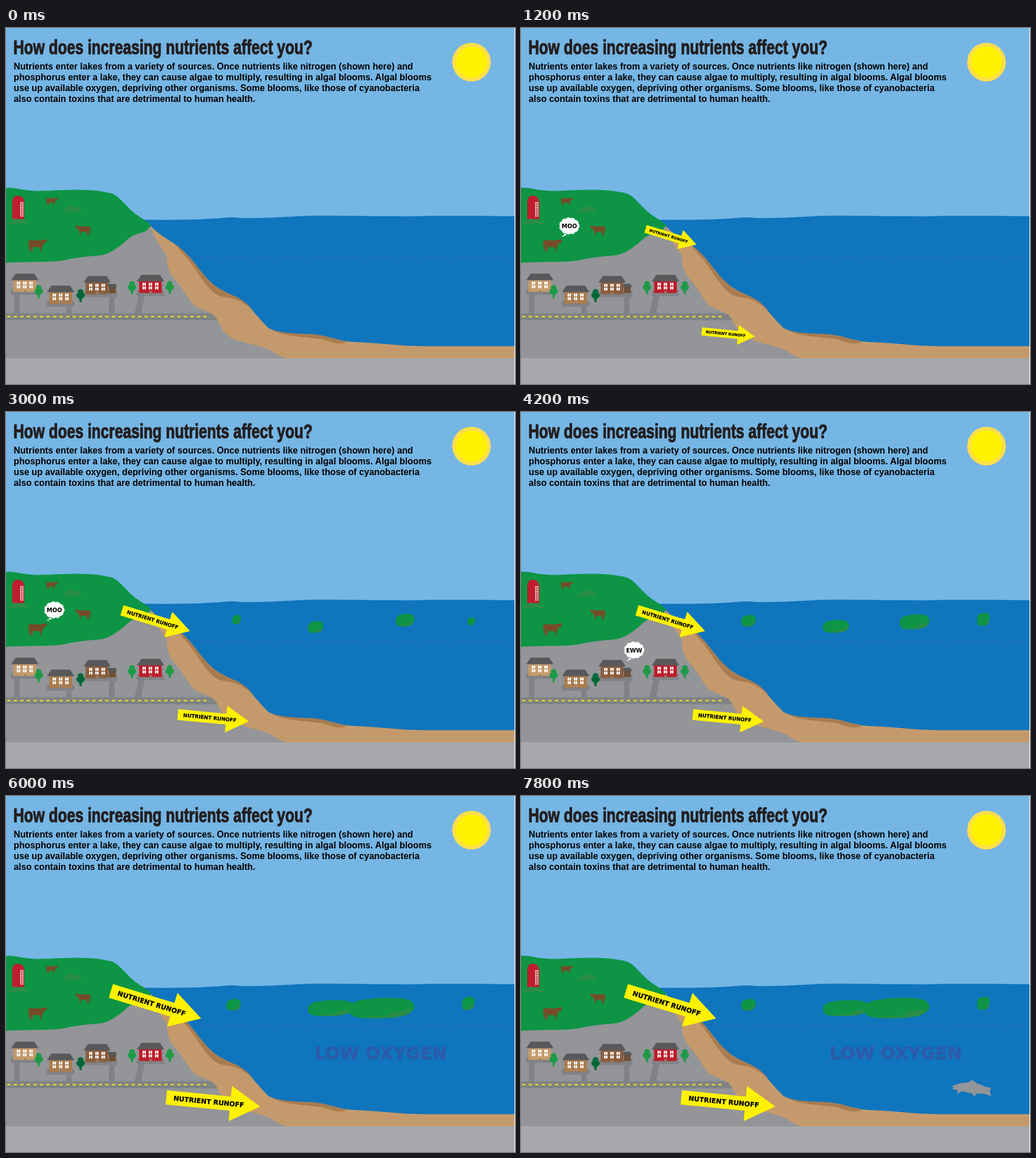
Write an HTML page that moves like this. It is 895 px wide and 626 px high and loops after 8000 ms.

```html
<!DOCTYPE html>
<html lang="en">
<head>
<meta charset="utf-8">
<title>How does increasing nutrients affect you?</title>
<style>
  html, body { margin: 0; width: 100%; height: 100%; overflow: hidden; background: #75b6e5; }
  svg { display: block; }
  .intro { font: bold 15.8px "Liberation Sans", Arial, sans-serif; }
  .title { font: bold 35px "Liberation Sans", Arial, sans-serif; fill: #231f20; stroke: #231f20; stroke-width: 1.2; }
  .wide { font-family: "DejaVu Sans", Verdana, sans-serif; font-weight: bold; text-anchor: middle; }
</style>
</head>
<body>
<svg width="895" height="626" viewBox="0 0 895 626">
  <defs>
    <path id="cow" d="M1 5Q2 2 5 2L23 2.5 27 1 29 1.5 33 0 34 4 31 7 28 8 26 14 24.500 16V22H22V16L20 14.500 10 14 9 17V22H6L5.500 16 4 21H2.500L3 12 2 8 1 14 0 15Z" fill="#754c29"/>
    <path id="bush" d="M-18 6Q-12 0-7-3L-3-7 2-3Q11-5 13 0L18 5 14 7 6 4-4 6Z" fill="#2a8d47"/>
    <g id="tree">
      <path d="M-1.500 3H1.500L2 13H-2Z"/>
      <circle cy="-5" r="5"/><circle cx="-3" cy="1" r="4.500"/><circle cx="3" cy="1" r="4.500"/><circle cy="4" r="4.500"/>
    </g>
    <g id="arrow">
      <path d="M-83-12.500H30V-31L83 0 30 31V12.500H-83Z" fill="#fff200"/>
      <text class="wide" x="-8" y="4.300" font-size="11.700" stroke="#000" stroke-width=".3">NUTRIENT RUNOFF</text>
    </g>
    <g id="bloom">
      <path d="M-.5.12C-.51-.2-.42-.38-.2-.43-.02-.5.2-.5.35-.44.48-.38.52-.15.49.05.45.28.36.38.2.44.02.5-.2.5-.34.46-.47.4-.5.28-.5.12Z" fill="#0d9545"/>
      <path d="M-.36.42Q-.1.38.08.35L.18.18.46.05Q.44.36.2.43-.1.51-.36.42Z" fill="#2a8d47"/>
    </g>
    <g id="cloud" fill="#fff"></g>
  </defs>

  <rect width="895" height="626" fill="#75b6e5"/>
  <circle cx="818.500" cy="60" r="34" fill="#ffde4d"/>
  <circle cx="818.500" cy="60" r="27.500" fill="#fff200"/>
  <text class="title" transform="translate(13 46) scale(.745 1)">How does increasing nutrients affect you?</text>
  <g id="intro" class="intro"></g>

  <path d="M238 337C290 338 335 337 365 335S395 332 410 334C450 335 490 332 525 330.500S680 332 720 331 830 330 895 331V581H238Z" fill="#0f75bd"/>
  <path d="M330 402.500H895" stroke="#2560b0" stroke-width="1.500" stroke-dasharray="6 5"/>
  <g id="algae"></g>
  <text id="oxygen" class="wide" x="659" y="463" font-size="30.800" fill="#2a5caa" stroke="#2a5caa">LOW OXYGEN</text>
  <path id="fish" d="M0 12Q14 4 29 5L37 0 44 6Q55 10 61 13L70 14 67 20 70 29 59 25 45 24 40 29 36 24 18 20 10 25 11 18Q5 18 1 16L5 14Z" fill="#939598"/>

  <path d="M0 350H256L300 400 340 460 400 520 500 581H0Z" fill="#939598"/>
  <g id="town">
    <path d="M0 501.500H380V514H0ZM14 466H24V503H14ZM106 486H115V503H106ZM181 470H191V503H181ZM234 466H245L237 503H226Z" fill="#808285"/>
    <path d="M2 507.500H358" stroke="#fff200" stroke-width="2" stroke-dasharray="6 5.500"/>
  </g>
  <path d="M252 346C265 359 276 367 288 374 315 390 328 409 343 428 364 455 380 462 403 472 428 485 438 505 461 527 477 538 518 538 558 543.500S590 551 610 552C660 554 690 559 735 559.500H895V581H492C478 576 474 571 462 565 440 556 410 553 394 543 373 529 376 511 362 503 350 495 338 495 328 485 312 464 310 456 297 442 278 420 287 410 281 397 269 380 260 368 254 349Z" fill="#c49a6c"/>
  <path d="M288 374C315 390 328 409 343 428 364 455 380 462 403 472 420 480 428 488 436 499 420 484 410 478 396 475 375 473 366 468 356 456 340 437 332 421 322 409 308 395 304 385 288 374ZM466 530C490 539 520 536 545 539S578 548 600 551C592 558 575 554 562 549 535 542 495 546 466 530Z" fill="#a97c50"/>
  <path d="M0 281C18 280 28 286 60 286.500 100 285 150 281 186 291 203 297 212 319 240 335L255 346Q251 356 239 360C222 364 216 369 208 377 193 389 181 398 164 400 138 402 122 404 104 408 80 413 40 410 0 413Z" fill="#0d9545"/>
  <rect y="581" width="895" height="45" fill="#a7a9ac"/>

  <use href="#bush" x="116" y="318"/>
  <use href="#bush" x="21" y="339"/>
  <path d="M11 336V304Q12 295 21 295T32 304V336Z" fill="#be1e2d"/>
  <path d="M25.500 306V332M30 306V332" stroke="#fff" stroke-width=".8"/>
  <path d="M27.800 306V332" stroke="#fff" stroke-width="4.500" stroke-dasharray="1 2"/>
  <use href="#cow" transform="translate(70 298) scale(.63)"/>
  <use href="#cow" transform="translate(149 347) scale(-.8 .8)"/>
  <use href="#cow" transform="translate(38 371)"/>
  <g id="houses"></g>
  <path d="M180 450H193L195 456H180Z" fill="#58595b"/>
  <path d="M181 456H193V466H181Z" fill="#754c29"/>
  <path d="M181 459H193M181 462H193" stroke="#58595b"/>
  <g fill="#1f9a49">
    <use href="#tree" x="57.500" y="462"/>
    <use href="#tree" x="131" y="469" fill="#006838"/>
    <use href="#tree" x="221.500" y="455"/>
    <use href="#tree" x="288" y="455"/>
  </g>

  <g id="arrows">
    <use href="#arrow"/>
    <use href="#arrow"/>
  </g>
  <g id="moo" transform="translate(85 348)">
    <use href="#cloud"/><text class="wide" y="4.200" font-size="10">MOO</text>
  </g>
  <g id="eww" transform="translate(199 418.500)">
    <use href="#cloud"/><text class="wide" y="4.200" font-size="9.800">EWW</text>
  </g>
  <rect x="894" width="1" height="626" fill="#fff"/>
</svg>
<script>
const $ = id => document.getElementById(id);
const LOOP = 8000, STEP = 600;

$('intro').innerHTML = [
  'Nutrients enter lakes from a variety of sources. Once nutrients like nitrogen (shown here) and',
  'phosphorus enter a lake, they can cause algae to multiply, resulting in algal blooms. Algal blooms',
  'use up available oxygen, depriving other organisms. Some blooms, like those of cyanobacteria',
  'also contain toxins that are detrimental to human health.'
].map((line, i) => `<text x="13.500" y="${73 + 19 * i}">${line}</text>`).join('');

const puff = (x, y, r) => `<circle cx="${x}" cy="${y}" r="${r}"/>`;
$('cloud').innerHTML = '<ellipse rx="15" ry="12"/>' + puff(-7.5, 15.5, 2) + puff(-11, 18, 1.3) +
  Array.from({ length: 11 }, (_, i) => {
    const a = i * Math.PI * 2 / 11;
    return puff(12.8 * Math.cos(a), 10 * Math.sin(a), 5.2);
  }).join('');

function house(x, y, wall, baseWidth = 48) {
  let panes = '';
  for (let i = 0; i < 3; i++)
    panes += `<path d="M${10 + 11 * i} 14h6v5h-6zm0 6.500h6v5h-6z" fill="#fff"/>
      <path d="M${13 + 11 * i} 14v12" stroke="${wall}" stroke-width=".8"/>`;
  return `<g transform="translate(${x} ${y})">
    <path d="M0 27H${baseWidth}V37H0Z" fill="#808285"/>
    <path d="M4 11H44V32H4Z" fill="${wall}"/>
    <path d="M8 0H41L48 11.500H0Z" fill="#58595b"/>${panes}
    <path d="M23 32V29H26V32" fill="#754c29" stroke="#ddd" stroke-width=".6"/></g>`;
}
$('houses').innerHTML = house(9, 432, '#c49a6c') + house(72, 453, '#a97c50') +
  house(136, 436, '#8b5e3c', 60) + house(230, 434, '#be1e2d');

// Each bloom: [step, centre x, centre y, width, height]
const blooms = [
  [[3, 406, 364, 4, 4], [5, 405.5, 365, 15, 17], [7, 400, 367, 25, 21]],
  [[3, 541, 378, 8, 6], [5, 544.5, 378, 27, 21], [7, 554, 377, 46, 23], [8, 564, 374, 66, 30], [10, 571, 373, 80, 29]],
  [[3, 705, 365, 8, 6], [5, 702, 366, 32, 23], [7, 692, 369, 52, 27], [8, 674.5, 370, 87, 32], [10, 661, 373, 114, 37]],
  [[3, 818, 368, 4, 4], [5, 818, 368, 13, 14], [7, 813, 364.5, 22, 24]]
];
$('algae').innerHTML = blooms.map(() => '<use href="#bloom"/>').join('');

function tween(keys, step) {
  const i = keys.findIndex(key => key[0] >= step);
  if (i < 0) return keys.at(-1);
  if (i === 0) return keys[0];
  const [a, b] = [keys[i - 1], keys[i]];
  const part = (step - a[0]) / (b[0] - a[0]);
  return a.map((v, k) => v + (b[k] - v) * part);
}

const show = (id, visible) => $(id).style.display = visible ? '' : 'none';

function draw(now) {
  const step = Math.floor(now % LOOP / STEP);
  const size = step < 4 ? .565 : step < 8 ? .755 : 1;
  const [upper, lower] = $('arrows').children;
  upper.setAttribute('transform', `translate(263.8 367) rotate(17) scale(${size})`);
  lower.setAttribute('transform', `translate(364.5 538) rotate(5.500) scale(${size})`);
  show('arrows', step >= 1);
  show('moo', step >= 2 && step <= 5);
  show('eww', step >= 6 && step <= 9);
  show('algae', step >= 4);
  show('oxygen', step >= 10);
  show('fish', step >= 11);
  $('fish').setAttribute('transform', `translate(${857 - 50 * (step - 11)} 499)`);
  blooms.forEach((keys, i) => {
    const [, x, y, w, h] = tween(keys, step);
    $('algae').children[i].setAttribute('transform', `translate(${x} ${y}) scale(${w} ${h})`);
  });
  requestAnimationFrame(draw);
}
requestAnimationFrame(draw);
</script>
</body>
</html>
```
